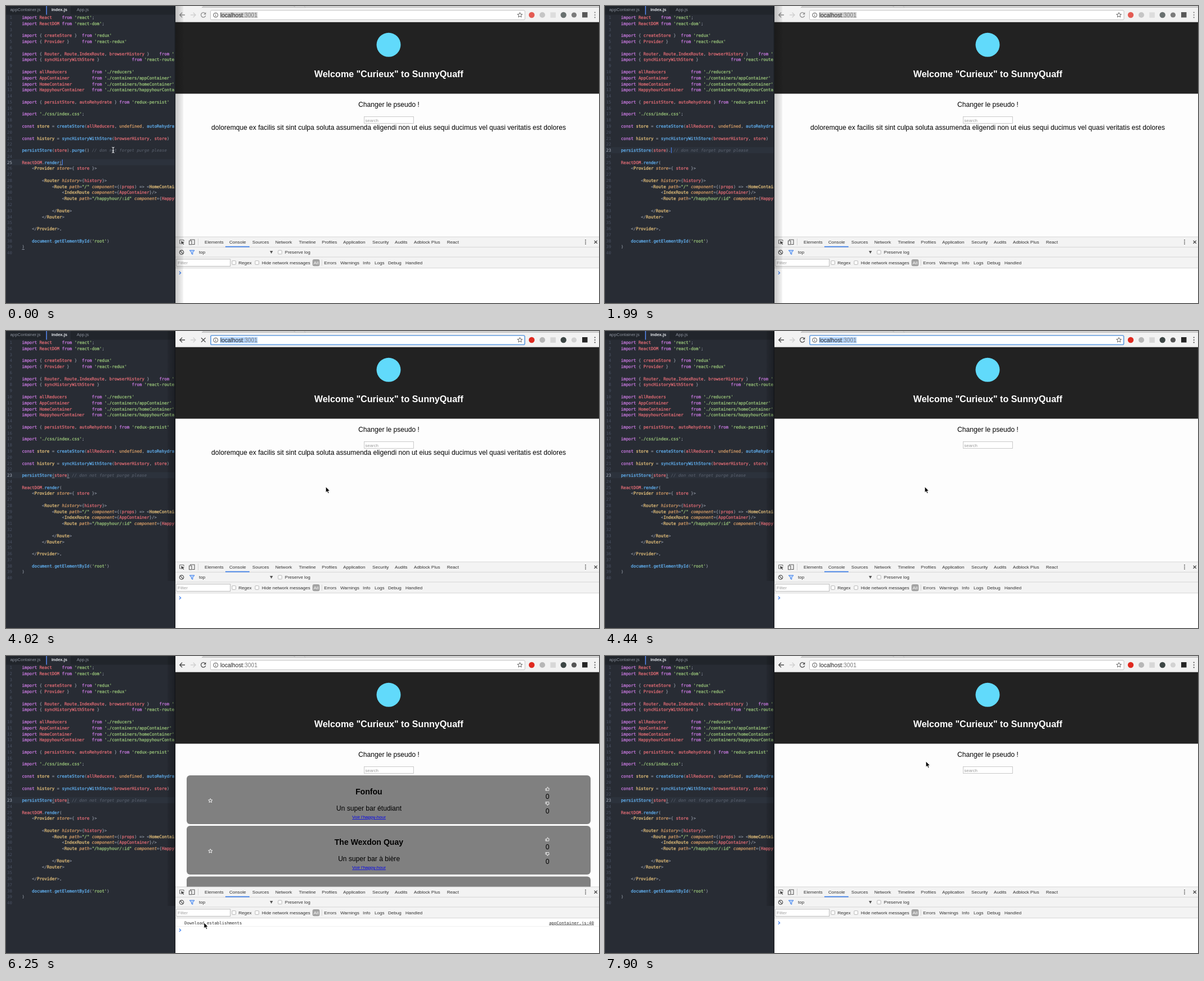
Recreate the animation shown at these times as an HTML page. Size 1057 by 530 pixels, loop 8 s.

```html
<!DOCTYPE html>
<html lang="en">
<head>
<meta charset="utf-8">
<title>Editor and browser</title>
<style>
html, body { margin: 0; width: 100%; height: 100%; overflow: hidden; background: #fff; }
svg { display: block; width: 1057px; height: 530px; }
text { font-family: "Liberation Sans", Arial, sans-serif; white-space: pre; }
.code text, .mono { font: 7.4px "DejaVu Sans Mono", Menlo, monospace; }
.code text { fill: #abb2bf; stroke-width: .28px; }
.code .num { fill: #4b5364; text-anchor: end; }
.code .num.on { fill: #abb2bf; }
.c { fill: #5c6370; font-style: italic; }
.s { fill: #98c379; stroke: #98c379; }
.k { fill: #c678dd; stroke: #c678dd; }
.t, .v { fill: #e5c07b; stroke: #e5c07b; }
.a { fill: #d19a66; stroke: #d19a66; font-style: italic; }
.n { fill: #d19a66; stroke: #d19a66; }
.f { fill: #61afef; stroke: #61afef; }
.i { fill: #e06c75; stroke: #e06c75; }
.mid { text-anchor: middle; }
.ui text { font-size: 8.1px; fill: #303030; }
.ui .hint { fill: #a0a0a0; }
.ui .badge { fill: #fff; }
</style>
</head>
<body>
<svg id="stage" viewBox="0 0 1057 530" xmlns="http://www.w3.org/2000/svg"></svg>
<script>
const LOOP = 8000, CHAR = 4.455, LEFT = 28.5, PITCH = 10.77;
const source = `import React    from 'react';
import ReactDOM from 'react-dom';

import { createStore }  from 'redux'
import { Provider }     from 'react-redux'

import { Router, Route,IndexRoute, browserHistory }    from 'react-router'
import { syncHistoryWithStore }             from 'react-router-redux'

import allReducers          from './reducers'
import AppContainer         from './containers/appContainer'
import HomeContainer        from './containers/homeContainer'
import HappyhourContainer   from './containers/happyhourContainer'

import { persistStore, autoRehydrate } from 'redux-persist'

import './css/index.css';

const store = createStore(allReducers, undefined, autoRehydrate())

const history = syncHistoryWithStore(browserHistory, store)



ReactDOM.render(
    <Provider store={ store }>

        <Router history={history}>
            <Route path="/" component={(props) => <HomeContainer {...props}/>}>
                <IndexRoute component={AppContainer}/>
                <Route path="/happyhour/:id" component={HappyhourContainer}/>

            </Route>
        </Router>

    </Provider>,

    document.getElementById('root')
)
`.split('\n');

const token = /(?<c>\/\/.*)|(?<s>'[^']*'|"[^"]*")|(?<k>\b(?:import|from|const)\b)|(?<t>(?<=<\/?)\w+)|(?<a>\w+(?==[{"]))|(?<f>\b[a-z]\w*(?=[.(]))|(?<v>\w+(?= = ))|(?<n>undefined)|(?<i>\w+)/g;
const esc = s => s.replace(/&/g, '&amp;').replace(/</g, '&lt;').replace(/>/g, '&gt;');

function paint(line) {
  let out = '', end = 0;
  for (const m of line.matchAll(token)) {
    const kind = Object.keys(m.groups).find(k => m.groups[k] !== undefined);
    out += esc(line.slice(end, m.index)) + `<tspan class="${kind}">${esc(m[0])}</tspan>`;
    end = m.index + m[0].length;
  }
  return out + esc(line.slice(end));
}

const rowY = n => 20.4 + (n - 1) * PITCH;
const colX = n => LEFT + n * CHAR;
const rect = (x, y, w, h, fill, more = '') => `<rect x="${x}" y="${y}" width="${w}" height="${h}" fill="${fill}" ${more}/>`;
const dot = (x, y, r, fill, more = '') => `<circle cx="${x}" cy="${y}" r="${r}" fill="${fill}" ${more}/>`;
const line = (d, stroke, w = 1, more = '') => `<path d="${d}" fill="none" stroke="${stroke}" stroke-width="${w}" ${more}/>`;
const text = (x, y, s, size, more = '') => `<text x="${x}" y="${y}" style="font-size:${size}px" ${more}>${esc(s)}</text>`;
const label = (x, y, s, kind = '') => `<text x="${x}" y="${y}" class="${kind}">${s}</text>`;
const show = (id, body, more = '') => `<g id="${id}" ${more}>${body}</g>`;

function editor() {
  const rows = source.map((s, i) => {
    const y = rowY(i + 1) + 2.7;
    return `<text class="num" id="num${i + 1}" x="11" y="${y}">${i + 1}</text>` +
      `<text id="row${i + 1}" x="${LEFT}" y="${y}">${paint(s)}</text>`;
  }).join('');
  return rect(0, 0, 302, 530, '#282c34') +
    rect(0, 0, 302, 15.5, '#21252b') + rect(72, 0, 43, 16, '#282c34') + rect(71.5, 0, 1.5, 15.5, '#568af2') +
    text(7.5, 8.6, 'appContainer.js', 7.8, 'fill="#8b919c"') +
    text(81, 8.6, 'index.js', 7.6, 'fill="#e4e7ec" font-weight="bold"') +
    text(126, 8.6, 'App.js', 7.8, 'fill="#8b919c"') +
    rect(0, 0, 301, 10.8, '#2c323c', 'id="current"') +
    `<g class="code" clip-path="url(#pane)">${rows}</g>` +
    show('marks', '') +
    rect(0, 0, 1, 10, '#528bff', 'id="caret"') +
    rect(300.6, 0, 1.4, 530, '#1b1e23');
}

function star(x, y, r) {
  let d = '';
  for (let i = 0; i < 10; i++) {
    const a = i * Math.PI / 5, q = i % 2 ? r * .45 : r;
    d += (i ? 'L' : 'M') + (x + q * Math.sin(a)).toFixed(2) + ' ' + (y - q * Math.cos(a)).toFixed(2);
  }
  return d + 'Z';
}

function toolbar() {
  return rect(302, 0, 755, 3, '#d3d3d3') + rect(302, 3, 755, 25.5, '#f2f2f2') +
    '<path d="M302 0H353L349 3H302Z" fill="#f2f2f2"/>' +
    line('M353 0L349 2.5H1057', '#b5b5b5', .7) +
    '<path d="M513 0L516 2.6H534L531 0Z" fill="#dedede" stroke="#aaa" stroke-width=".6"/>' +
    line('M302 28.3H1057', '#c9c9c9', .8) +
    show('nav', line('M319 16H310M314 11.7L309.7 16L314 20.3', '#484848', 1.3)) +
    line('M329 16H338M333.7 11.7L338 16L333.7 20.3', '#cfcfcf', 1.3) +
    show('reload', line('M355 13.2A4.2 4.2 0 1 0 355.8 17.2', '#505050', 1.3) + '<path d="M356.4 11V15.2H352.2Z" fill="#505050"/>') +
    show('stop', line('M348 12.2L355.6 19.8M355.6 12.2L348 19.8', '#505050', 1.3)) +
    rect(364.5, 7.8, 560.5, 16.8, '#fff', 'rx="2" stroke="#bdbdbd" stroke-width=".9"') +
    rect(365, 8, 559.5, 16.4, 'none', 'id="ring" rx="2" stroke="#6ba4e6" stroke-width="1.7"') +
    rect(381.5, 10.8, 67, 10.8, '#d3d3d3', 'id="picked"') +
    dot(373.8, 16.2, 4, 'none', 'stroke="#555" stroke-width="1"') + line('M373.8 15.6V18.4M373.8 13.7V14.7', '#555') +
    '<text x="382" y="19.6" style="font-size:10.25px" fill="#222">localhost<tspan fill="#7b7b7b">:3001</tspan></text>' +
    line(star(916, 16.2, 4.6), '#555', .9) +
    show('tools', dot(937, 16, 5.2, '#e02a20') + dot(956, 16, 5, '#b7b7b7') +
      rect(970.3, 11.3, 9.6, 9.6, '#d7d7d7') + dot(993.7, 16, 5.2, '#3d4645') +
      dot(1012.5, 16, 4.6, '#555', 'id="badge"') + rect(1027, 11, 9.5, 9.5, '#262626') +
      [11.6, 16, 20.4].map(y => dot(1049.7, y, 1.1, '#555')).join(''));
}

function card(y, name, about) {
  const thumb = 'M-3.2-.4H-1.4V3H-3.2ZM-1.4-.4L.3-3.2Q1.5-3 .9-.9H3.1L2.6 3H-1.4';
  const vote = (cy, flip) => line(thumb, '#fff', .8, `transform="translate(965 ${cy}) scale(1 ${flip})"`);
  return `<g transform="translate(0 ${y})">` + rect(322, 0, 720, 87, '#808080', 'rx="6"') +
    line(star(364.3, 45.2, 3.8), '#fff', .9) +
    text(646.8, 33.8, name, 14.1, 'class="mid" font-weight="bold"') +
    text(647, 63, about, 12.1, 'class="mid"') +
    text(647, 77, "Voir l'happy-hour", 8, 'class="mid" fill="#00e" text-decoration="underline"') +
    vote(24, 1) + vote(50.5, -1) +
    text(965, 41.6, '0', 12.1, 'class="mid"') + text(965, 67.6, '0', 12.1, 'class="mid"') + '</g>';
}

function page() {
  return rect(302, 28.6, 755, 384, '#fdfdfd') + rect(302, 28.6, 755, 127.9, '#222') +
    dot(682, 69.3, 21.5, '#61dafb') +
    text(682.3, 127, 'Welcome "Curieux" to SunnyQuaff', 16.13, 'class="mid" fill="#fff" font-weight="bold"') +
    text(682.5, 180.2, 'Changer le pseudo !', 12.1, 'class="mid"') +
    rect(638.5, 197.5, 88, 12, '#fff', 'stroke="#c4c4c4" stroke-width=".9"') +
    text(640.3, 206.5, 'search', 7.9, 'fill="#999"') +
    show('quote', text(682, 221.3, 'doloremque ex facilis sit sint culpa soluta assumenda eligendi non ut eius sequi ducimus vel quasi veritatis est dolores', 12.1, 'class="mid"')) +
    show('cards', card(213, 'Fonfou', 'Un super bar étudiant') + card(303, 'The Wexdon Quay', 'Un super bar à bière') + card(393.5, '', ''));
}

function devtools() {
  const tabs = { Elements: 354, Console: 398, Sources: 439, Network: 480, Timeline: 522, Profiles: 563, Application: 601, Security: 653, Audits: 693, 'Adblock Plus': 727, React: 786 };
  const levels = { Errors: 567, Warnings: 596, Info: 636, Logs: 657, Debug: 681, Handled: 712 };
  const names = (set, y) => Object.entries(set).map(([s, x]) => label(x, y, s)).join('');
  const box = (x, y) => rect(x - 3.3, y - 3.3, 6.6, 6.6, '#fff', 'rx="1" stroke="#a5a5a5" stroke-width=".8"');
  const prompt = y => line(`M308.8 ${y - 2.5}L311.6 ${y}L308.8 ${y + 2.5}`, '#367cf1', 1.2);
  return '<g class="ui">' + rect(302, 412, 755, 118, '#fff') + rect(302, 412, 755, 55.5, '#f3f3f3') +
    rect(433, 412.5, 42, 17.5, '#e2e2e2', 'id="hover"') +
    line('M302 412H1057M302 430.3H1057M302 448H1057M302 467.6H1057', '#cdcdcd', .8) +
    rect(391, 428.7, 43, 1.7, '#3b7de9') + names(tabs, 424) +
    line('M312 424H309.5V417.5H317V420', '#5a5a5a', .9) +
    '<path d="M312 419.5L318 422L315.6 422.9L317.3 425.2L316.3 426L314.6 423.6L313 425.4Z" fill="#444"/>' +
    line('M328.5 418V417H336V425.5H332M326.5 419H331V425.7H326.5Z', '#5a5a5a', 1.1) + line('M342.5 415V427', '#ccc', .8) +
    [417.8, 421.2, 424.6].map(y => dot(1033, y, 1, '#555')).join('') +
    line('M1048.6 418.6L1053.8 423.8M1053.8 418.6L1048.6 423.8', '#444', 1.3) +
    dot(313, 439.5, 3.7, 'none', 'stroke="#4d4d4d" stroke-width="1.2"') + line('M310.4 436.9L315.6 442.1', '#4d4d4d', 1.2) +
    '<path d="M327.3 436H336L332.8 439.8V443.3L330.5 442V439.8Z" fill="#b8d4fc" stroke="#3b7de9" stroke-width="1"/>' +
    label(344, 442.2, 'top') + '<path d="M470.3 437H475.7L473 442Z" fill="#555"/>' +
    box(488.4, 439.4) + label(497, 442.2, 'Preserve log') +
    rect(303.8, 451.8, 96, 12.6, '#fff', 'stroke="#b3b3b3" stroke-width=".9"') + label(306, 461, 'Filter', 'hint') +
    box(406.3, 458) + label(414.5, 460.8, 'Regex') + box(447.4, 458) + label(456, 460.8, 'Hide network messages') +
    rect(546.3, 452, 12.8, 12.3, '#a3a3a3', 'rx="3"') + label(552.7, 460.8, 'All', 'mid badge') +
    line('M563 452.5V463.5', '#ccc', .8) + names(levels, 460.8) + '</g>' +
    show('log', '<text class="mono" x="318" y="478.6" fill="#303030">Download establishments</text>' +
      '<text class="mono" x="1048" y="478.6" fill="#333" text-anchor="end" text-decoration="underline">appContainer.js:40</text>' +
      line('M302 482.5H1057', '#eee', .8) + prompt(489.3)) +
    show('ready', prompt(476.3));
}

const fade = (id, from, to) =>
  `<linearGradient id="${id}"><stop stop-opacity="${from}"/><stop offset="1" stop-opacity="${to}"/></linearGradient>`;
document.getElementById('stage').innerHTML =
  '<defs><clipPath id="pane"><rect width="300.6" height="530"/></clipPath>' + fade('out', .22, .04) + fade('in', .08, .3) + '</defs>' +
  editor() + page() + toolbar() + devtools() +
  rect(302, 0, 14, 530, 'url(#out)', 'id="shadeOut"') + rect(288, 0, 14, 446, 'url(#in)', 'id="shadeIn"') +
  show('beam', line('M-2.3-5Q0-5 0-3.6V3.6Q0 5-2.3 5M2.3-5Q0-5 0-3.6M0 3.6Q0 5 2.3 5M-1.3 1.4H1.3', '#e9ebee', 1.1)) +
  show('arrow', '<path d="M0 0V10.2L2.4 8.1L4 11.8L5.8 11L4.2 7.5H7.3Z" fill="#000" stroke="#fff" stroke-width=".8"/>');

const el = {};
document.querySelectorAll('[id]').forEach(e => el[e.id] = e);
const see = (id, on) => el[id].setAttribute('visibility', on ? 'visible' : 'hidden');
const place = (id, x, y) => el[id].setAttribute('transform', `translate(${x.toFixed(2)} ${y.toFixed(2)})`);

// Pointer stops: time, x, y
const path = [[0, 191, 257], [50, 172, 257], [230, 168, 257], [700, 146.5, 257.5], [2520, 146.5, 257.5], [2720, 285, 260],
  [2810, 345, 294], [3290, 480, 290], [3700, 570, 278], [4480, 570, 278], [4800, 450, 425], [4970, 404, 464],
  [5220, 385, 476], [5600, 400, 480], [6070, 330, 478], [6400, 370, 474], [6930, 534, 192], [7340, 572, 188], [LOOP, 572, 188]];

function pointer(t) {
  const i = path.findIndex(p => t < p[0]), a = path[i - 1], b = path[i];
  const u = (t - a[0]) / (b[0] - a[0]), e = u * u * (3 - 2 * u);
  return [a[1] + (b[1] - a[1]) * e, a[2] + (b[2] - a[2]) * e];
}

const CLICK = 900, ERASE = 1320, KEY = 102, FOCUS = 3050, BLUR = 5700;
const call = '.purge()';
let shown;

function draw(t) {
  const cut = t < ERASE ? 0 : Math.min(8, Math.floor((t - ERASE) / KEY) + 1);
  if (cut !== shown) {
    el.row23.innerHTML = paint('persistStore(store)' + call.slice(0, 8 - cut) + ' // don not forget purge please');
    shown = cut;
  }
  const clicked = t >= CLICK, row = clicked ? 23 : 25, col = clicked ? 27 - cut : 16;
  el.current.setAttribute('y', rowY(row) - 5.4);
  el.num23.classList.toggle('on', clicked);
  el.num25.classList.toggle('on', !clicked);
  const pairs = !clicked ? [[25, 15], [39, 0]] : cut === 0 ? [[23, 25], [23, 26]] : cut === 8 ? [[23, 12], [23, 18]] : [];
  el.marks.innerHTML = pairs.map(([r, c]) => rect(colX(c), rowY(r) + 4.3, CHAR, .9, '#9aa3b2')).join('');

  const edit = cut ? ERASE + (cut - 1) * KEY : clicked ? CLICK : 0;
  see('caret', t < FOCUS && (t - edit) % 800 < 400);
  el.caret.setAttribute('x', colX(col) + .2);
  el.caret.setAttribute('y', rowY(row) - 5);

  const active = t >= FOCUS, typing = t >= ERASE && t < 2520;
  see('shadeOut', !active);
  see('shadeIn', active);
  el.nav.setAttribute('opacity', active ? 1 : .6);
  el.tools.setAttribute('opacity', active ? 1 : .75);
  see('ring', active && t < BLUR);
  see('picked', t < BLUR);
  el.picked.setAttribute('fill', active ? '#b3d4fc' : '#d3d3d3');

  const busy = (t >= 3960 && t < 4440) || (t >= 7480 && t < 7900);
  see('stop', busy);
  see('reload', !busy);
  el.reload.setAttribute('opacity', active ? 1 : .6);
  el.badge.setAttribute('fill', busy || t >= 7480 ? '#d2d2d2' : '#555');
  see('quote', t < 4140);
  see('cards', t >= 4500 && t < 7660);
  const logged = t >= 4530 && t < 7480;
  see('log', logged);
  see('ready', !logged);
  see('hover', t >= 4800 && t < 5050);

  const [x, y] = pointer(t), beam = x < 300;
  see('beam', beam && !typing);
  see('arrow', !beam);
  place(beam ? 'beam' : 'arrow', x, y);
}

const start = performance.now();
function tick() {
  draw((performance.now() - start) % LOOP);
  requestAnimationFrame(tick);
}
draw(0);
tick();
</script>
</body>
</html>
```
